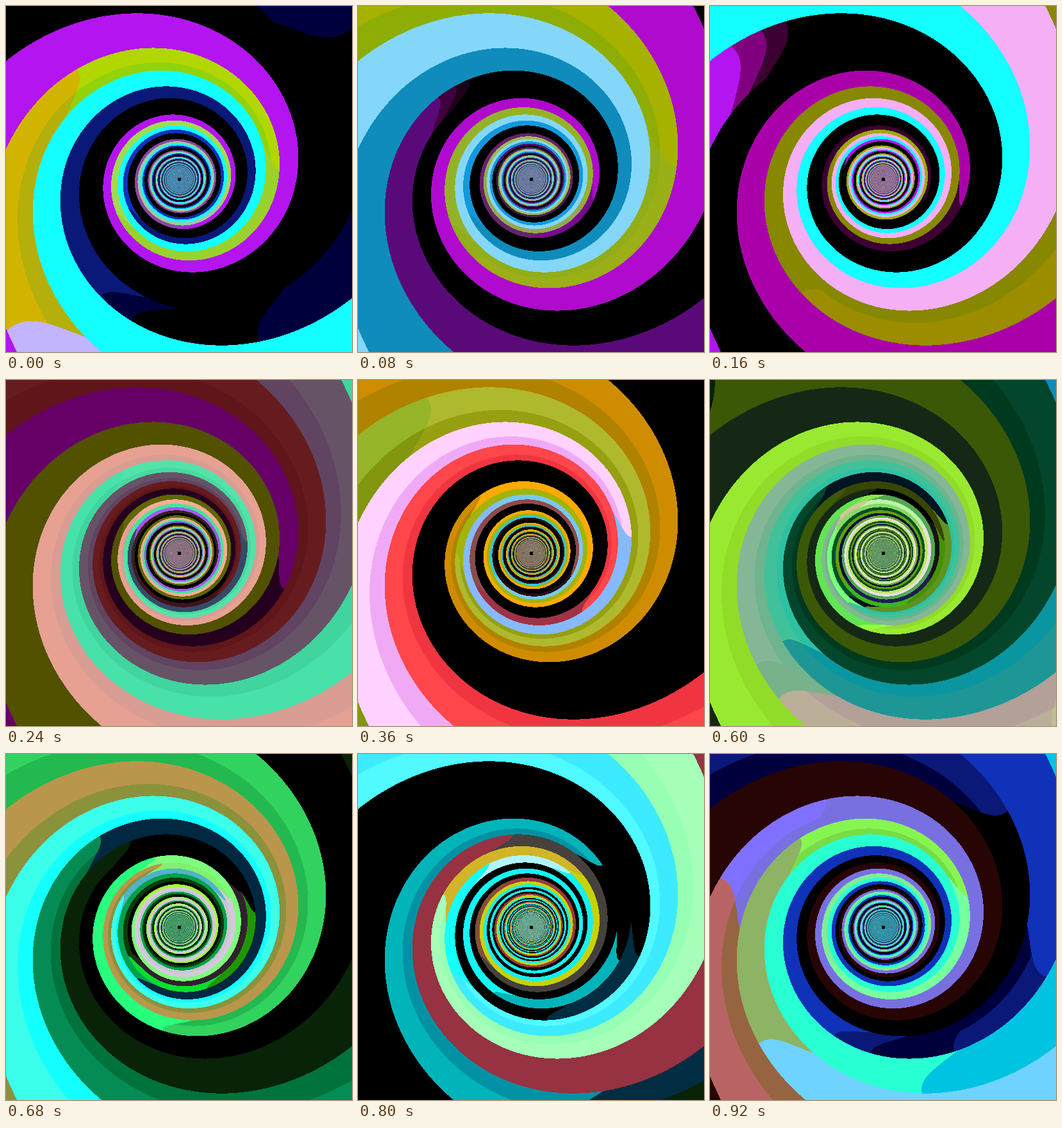
Animation, 540 px wide and 540 px high, one loop 0.96 s. Source, as an HTML page with a canvas:

```html
<!DOCTYPE html>
<html lang="en">
<head>
<meta charset="utf-8">
<title>Spiral tunnel</title>
<style>
  html, body { margin: 0; width: 100%; height: 100%; overflow: hidden; background: #000; }
  canvas { display: block; width: 540px; height: 540px; }
</style>
</head>
<body>
<canvas id="stage" width="540" height="540"></canvas>
<script>
const SIZE = 540, STEPS = 24, STEP_MS = 40, ARMS = 6;
const ZOOM = 1006;          // depth = ZOOM / radius
const RES = 32, DEPTHS = 24 * RES;
const INNER = 0.6;          // where the inner shade of a band begins
const BEND = 0.3;           // how far a colour change curves across its band
const HAZE_FROM = 28, HAZE_TO = 55;

// Each arm runs from outside to inside: colour[/inner shade], depth of change, colour, ...
const moods = [
  { step: 0, haze: '4a8cb4', arms: [
    '14ffff',
    '00003c 3.55 000000 4.3 00003c 4.55 0a1978 11 0f32b9',
    '00003c 2.8 000000',
    '000000',
    '6e1e1e 1.85 b414f0 13 8c46a0',
    'c3b4ff 2.8 d2b400/b4af0a 4.28 b2d600/92d20a 6.4 9ad22d 9 a0dc50 13 a0c8a0'] },
  { step: 4, haze: '966e96', arms: [
    'f5aff5',
    '14ffff',
    'b414f0 3.2 800080 3.33 3c0032 3.46 000000 15 b414f0',
    '000000',
    'aa00aa 7.8 3c0032 14 000000',
    '9b8c00/878700 4.6 878700 12 a0aa00'] },
  { step: 9, haze: '8c786e', arms: [
    'cf8c00/b08200 8.3 ffaa00',
    '96b428/82960f 3.45 afb92d/96a010 8.5 a0b40a',
    'ffd2ff/f0aaf5 6.35 87b9ff 10.5 78c8f0 15 32c8d7',
    'ff464b/f03540 8.3 a03246 10 8c4b4b 14 280f14',
    '000000',
    '000000'] },
  { step: 13, haze: '829664', arms: [
    '282d00 2.88 0a230a/000000 4.3 6e8c05 15 bcff00',
    '28502a 11.9 000000 14 0a1978',
    'd2ff00 1.9 ffff00 10.3 9bc828 13 28502a',
    'dcf0f0/cdd5d5 4.3 d7d2ff/c3b4ff 5.6 50d7e1 13.2 f5f5e1',
    '0a1978 4.95 002d41 6.8 468246 12.6 bcff00',
    '000000 11.1 bcff00 13.3 000000'] },
  { step: 17, haze: '3c9664', arms: [
    '082308 6.5 000000 8.3 1e9600 9.6 0adc32 11 0a3c0a',
    '000000 9 32202d 12 000000',
    '32d25f/23b950 6.15 28ff7d 8.7 7dff7d 14 a0ff3c',
    'a08c32 1.8 b9964b/8c913c 9.75 82f06e 11 d7c8dc',
    '3cffeb/14ffff 10 50b4c8 12 c8c8d2',
    '058c55/00733c 5.3 002841 9.65 05a04b'] },
  { step: 20, haze: '6eaa96', arms: [
    '000000 5.75 002d41 6.85 000000',
    '000000 6.85 00b4b9 8.5 14f5f5',
    '082308/002d41 2.9 00b4b9/0091a5 6.8 000000',
    '963241 6.8 46413c 11 82503c 12.5 963c3c',
    'a5ffb9/96ffb4 6.85 d2b428 8.75 c8d200',
    '3cebff/50faff 7 14ffff 8.45 aff5ff 9.6 14f0f5'] },
  { step: 23, haze: '3296aa', arms: [
    '00c3e1 3.79 28ffd2',
    '0f32b9 3.79 0a1978/00003c 4.5 00003c 5.1 0a1978 5.4 0f32b9',
    '0a1978/00003c 3.79 000000',
    '280505',
    'b96464/966441 3.79 8070ff/7870e1 4.6 7870e1',
    '70d2ff 3.79 8cb464 5.27 87f550/78dc46 7.15 78ffa0 10 82eb96'] }
];

const rgb = hex => [0, 2, 4].map(i => parseInt(hex.slice(i, i + 2), 16));
const mix = (a, b, k) => a.map((v, i) => v + (b[i] - v) * k);
const pack = c => (255 << 24 | Math.round(c[2]) << 16 | Math.round(c[1]) << 8 | Math.round(c[0])) >>> 0;
const clamp = (v, lo, hi) => Math.min(hi, Math.max(lo, v));

function parseArm(text) {
  const parts = text.split(' '), runs = [];
  for (let i = 0; i < parts.length; i += 2) {
    const [main, inner = main] = parts[i].split('/');
    runs.push({ end: Number(parts[i + 1] || Infinity), shades: [rgb(main), rgb(inner)] });
  }
  return runs;
}
for (const mood of moods) {
  mood.arms = mood.arms.map(parseArm);
  mood.haze = rgb(mood.haze);
}
const armColour = (mood, arm, depth, shade) =>
  mood.arms[arm].find(run => depth < run.end).shades[shade];

const ctx = document.getElementById('stage').getContext('2d');
const image = ctx.createImageData(SIZE, SIZE);
const pixels = new Uint32Array(image.data.buffer);
const band = new Uint8Array(SIZE * SIZE);
const spot = new Uint16Array(SIZE * SIZE);
const haze = new Float32Array(SIZE * SIZE);
const table = new Uint32Array(ARMS * 2 * DEPTHS);
const wrap = n => (n % ARMS + ARMS) % ARMS;

// The geometry never changes: six arms wound round a 1/r tunnel.
for (let y = 0, p = 0; y < SIZE; y++) {
  for (let x = 0; x < SIZE; x++, p++) {
    const dx = x - SIZE / 2, dy = y - SIZE / 2;
    const radius = Math.max(1, Math.hypot(dx, dy));
    const turn = (Math.atan2(dx, -dy) / (2 * Math.PI) + 1) % 1;
    const depth = ZOOM / radius;
    const wound = depth - ARMS * turn;
    const index = Math.floor(wound), part = wound - index;
    const along = depth - part + BEND * part * part;
    band[p] = wrap(index);
    spot[p] = clamp(Math.floor(along * RES), 0, DEPTHS - 1) + (part > INNER ? DEPTHS : 0);
    haze[p] = radius < 3 ? -1 : clamp((depth - HAZE_FROM) / (HAZE_TO - HAZE_FROM), 0, 1);
  }
}

// Colours travel outward one depth unit per step while one mood fades into the next.
function fillTable(step) {
  const at = moods.findLastIndex(mood => mood.step <= step);
  const from = moods[at], to = moods[(at + 1) % moods.length];
  const span = (to.step - from.step + STEPS) % STEPS;
  const passed = step - from.step, k = passed / span;
  for (let arm = 0, i = 0; arm < ARMS; arm++) {
    for (let shade = 0; shade < 2; shade++) {
      for (let d = 0; d < DEPTHS; d++, i++) {
        const depth = (d + 0.5) / RES;
        table[i] = pack(mix(
          armColour(from, arm, depth + passed, shade),
          armColour(to, arm, depth - (span - passed), shade), k));
      }
    }
  }
  return mix(from.haze, to.haze, k);
}

function draw(step) {
  const fog = fillTable(step);
  for (let p = 0; p < pixels.length; p++) {
    const arm = (band[p] + step) % ARMS;
    const colour = table[arm * 2 * DEPTHS + spot[p]];
    const h = haze[p];
    pixels[p] = h === 0 ? colour
      : h < 0 ? 0xff000000
      : pack(mix([colour & 255, colour >> 8 & 255, colour >> 16 & 255], fog, h * 0.85));
  }
  ctx.putImageData(image, 0, 0);
}

let shown = -1;
function tick(now) {
  const step = Math.floor(now / STEP_MS) % STEPS;
  if (step !== shown) draw(shown = step);
  requestAnimationFrame(tick);
}
draw(0);
requestAnimationFrame(tick);
</script>
</body>
</html>
```
